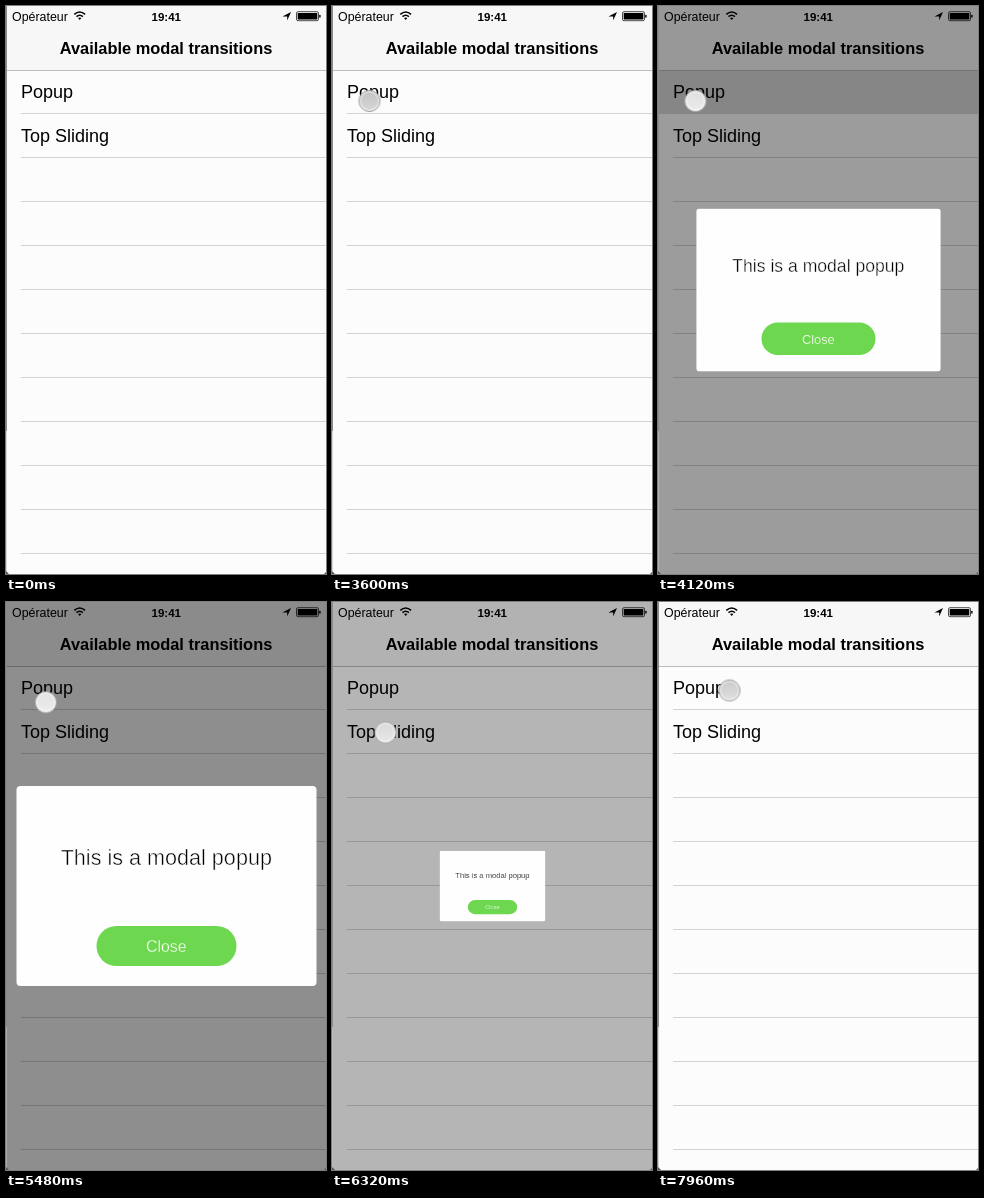
Write an HTML page that moves like this. It is 320 px wide and 568 px high and loops after 8 s.

```html
<!DOCTYPE html>
<html lang="en">
<head>
<meta charset="utf-8">
<title>Modal transitions</title>
<style>
  html, body { margin: 0; width: 100%; height: 100%; overflow: hidden; background: #fcfcfc; }
  svg { display: block; width: 320px; height: 568px; }
  text { font-family: "Liberation Sans", Arial, sans-serif; }
  .status { font-size: 12.4px; }
  .clock { font-size: 11.5px; font-weight: bold; text-anchor: middle; }
  .title { font-size: 16.4px; font-weight: bold; text-anchor: middle; }
  .row { font-size: 18px; }

  /* A stroke in the background colour thins the glyphs to a light weight */
  .message { font-size: 21.6px; text-anchor: middle; stroke: #fff; stroke-width: .55px; }
  .button { font-size: 15.8px; text-anchor: middle; fill: #fff; stroke: #6dd74f; stroke-width: .3px; }

  .dim, .popup, .cursor, .selected, .press { animation: 8s linear infinite; }
  .dim { animation-name: dim; }
  .popup { animation-name: popup; transform-origin: 160.5px 284px; }
  .cursor { animation-name: cursor; }
  .selected { animation-name: selected; }
  .press { animation-name: press; }

  @keyframes dim {
    0% { opacity: 0; }
    49.75% { opacity: 0; animation-timing-function: ease-out; }
    52.25%, 77.25% { opacity: .44; animation-timing-function: ease-in; }
    80.5%, 100% { opacity: 0; }
  }
  @keyframes popup {
    0% { transform: scale(0); }
    49.75% {
      transform: scale(0);
      animation-timing-function: linear(0, .178, .481, .731, .889, .972, 1.006, 1.015, 1.013, 1.008, 1.004, 1.002, 1);
    }
    55.75% { transform: scale(1); }
    77.25% { transform: scale(1); animation-timing-function: ease-in-out; }
    80.25%, 100% { transform: scale(0); }
  }
  @keyframes cursor {
    0%, 25.5% { transform: translate(-12px, 52px); animation-timing-function: ease-out; }
    34.5%, 68% { transform: translate(37.5px, 95px); animation-timing-function: linear; }
    71.5%, 89% { transform: translate(53.5px, 130.5px); animation-timing-function: ease-in-out; }
    95.5%, 97.5% { transform: translate(71.5px, 91px); }
    99.5%, 100% { transform: translate(71.5px, 88.5px); }
  }
  @keyframes selected {
    0%, 47.49% { opacity: 0; }
    47.5%, 52.5% { opacity: .14; }
    57.5%, 100% { opacity: 0; }
  }
  @keyframes press {
    0%, 44.99%, 47.5%, 74.99%, 77.5%, 100% { opacity: 0; }
    45%, 47.49%, 75%, 77.49% { opacity: .04; }
  }
</style>
</head>
<body>
<svg viewBox="0 0 320 568">
  <defs>
    <pattern id="rows" width="320" height="44" y="64" patternUnits="userSpaceOnUse">
      <rect x="15" y="43" width="305" height="1" fill="#d2d1d4"/>
    </pattern>
    <linearGradient id="disc" x2="0" y2="1">
      <stop stop-color="#cbcbcb"/>
      <stop offset="1" stop-color="#e0e0e0"/>
    </linearGradient>
  </defs>

  <rect width="320" height="568" fill="#fcfcfc"/>
  <rect class="selected" y="64" width="320" height="44"/>
  <rect y="64" width="320" height="504" fill="url(#rows)"/>
  <rect width="320" height="64" fill="#f7f7f8"/>
  <rect y="64" width="320" height="1" fill="#bcbbbe"/>
  <rect class="dim" width="320" height="568"/>

  <!-- Screen edges -->
  <rect width="1" height="425" fill="#8a8a8a"/>
  <rect y="425" width="1" height="143" fill="#c0c0c0" opacity=".6"/>
  <path d="M0 565v3h3zM320 566v2h-2z" fill="#555"/>

  <!-- Status bar -->
  <text class="status" x="6" y="14.5">Opérateur</text>
  <g fill="none" stroke="#000" stroke-width="1.6">
    <path d="M68.3 8.4Q73.7 3.6 79.1 8.4M70.5 10.7Q73.7 7.8 76.9 10.7"/>
    <path d="M72 12.1Q73.7 10.8 75.4 12.1L73.7 14z" fill="#000" stroke="none"/>
  </g>
  <text class="clock" x="160.3" y="14.5">19:41</text>
  <path d="M285 6L281.2 14.6V10.4H276.4z"/>
  <rect x="290.5" y="5.7" width="22" height="9" rx="1.5" fill="none" stroke="#000" stroke-width=".7"/>
  <rect x="291.7" y="6.9" width="19.6" height="6.6" rx=".6"/>
  <rect x="313.2" y="8.7" width="1.4" height="3" rx=".7"/>

  <text class="title" x="160" y="48">Available modal transitions</text>
  <text class="row" x="15" y="92">Popup</text>
  <text class="row" x="15" y="136">Top Sliding</text>

  <g class="popup">
    <rect x="10.5" y="184" width="300" height="200" rx="4" fill="#fefefe"/>
    <text class="message" x="160.3" y="262.5">This is a modal popup</text>
    <rect x="90.5" y="324" width="140" height="40" rx="20" fill="#6dd74f"/>
    <text class="button" x="160.3" y="350">Close</text>
  </g>

  <g class="cursor">
    <circle r="10.6" fill="url(#disc)" stroke="#a6a6a6"/>
    <circle class="dim" r="10" fill="#fff"/>
    <circle r="8.8" fill="none" stroke="#fff" stroke-width="1.2" opacity=".45"/>
    <circle class="press" r="9"/>
  </g>
</svg>
</body>
</html>
```
